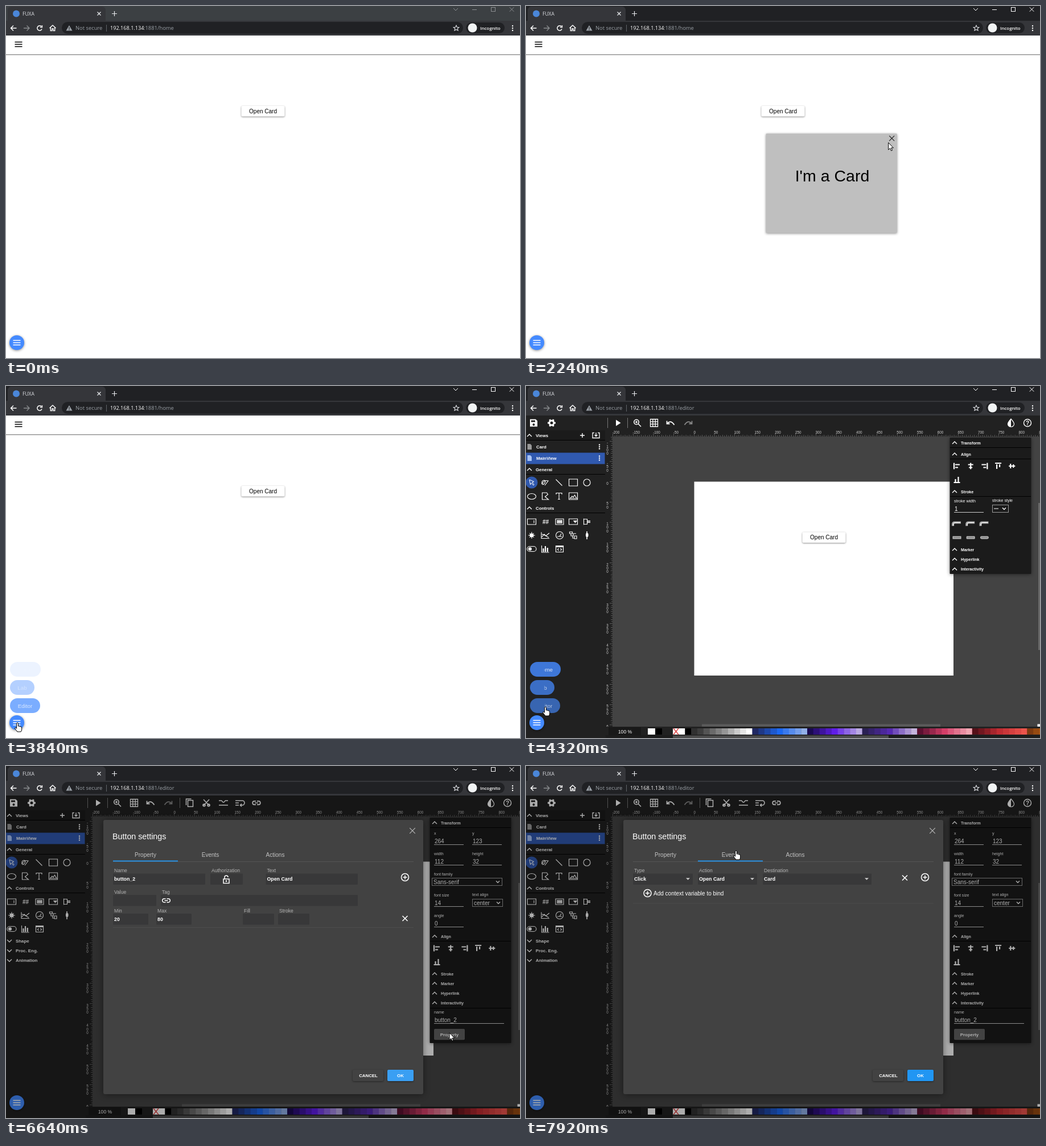
Write an HTML page with a canvas that moves like this. It is 903 px wide and 620 px high and loops after 8000 ms.

```html
<!DOCTYPE html>
<html lang="en">
<head>
<meta charset="utf-8">
<title>Card demo</title>
<style>
html, body { margin: 0; width: 100%; height: 100%; overflow: hidden; background: #fff }
canvas { display: block }
</style>
</head>
<body>
<canvas id="stage" width="903" height="620"></canvas>
<script>
const g = document.getElementById('stage').getContext('2d');
const SANS = '"Liberation Sans", Arial, sans-serif', UI = '"Open Sans", "Noto Sans", sans-serif';
const BLUE = '#3059af';

// ---- helpers ----
const clamp = v => Math.max(0, Math.min(1, v));
const ease = v => (v = clamp(v), v * v * (3 - 2 * v));

function rect(x, y, w, h, fill, r = 0, shadow = 0) {
  g.save();
  if (shadow) { g.shadowColor = 'rgba(0,0,0,.45)'; g.shadowBlur = shadow; g.shadowOffsetY = 1; }
  g.fillStyle = fill;
  g.beginPath();
  g.roundRect(x, y, w, h, r);
  g.fill();
  g.restore();
}
function box(x, y, w, h, color) {
  g.strokeStyle = color;
  g.lineWidth = 1;
  g.strokeRect(x + .5, y + .5, w, h);
}
function disc(x, y, r, fill) {
  g.fillStyle = fill;
  g.beginPath();
  g.arc(x, y, r, 0, 7);
  g.fill();
}
function path(d, x, y, stroke = '#fff', width = 1, fill) {
  const p = new Path2D(d);
  g.save();
  g.translate(x, y);
  if (fill) { g.fillStyle = fill; g.fill(p, 'evenodd'); }
  if (stroke) { g.strokeStyle = stroke; g.lineWidth = width; g.stroke(p); }
  g.restore();
}
const shape = (d, x, y, fill = '#fff') => path(d, x, y, null, 0, fill);
// y is the middle of the capitals
function text(s, x, y, size = 10, color = '#fff', weight = '', align = 'left', family = SANS) {
  g.font = `${weight} ${size}px ${family}`;
  g.fillStyle = color;
  g.textAlign = align;
  g.fillText(s, x, Math.round(y + size * .36));
}
const ring = r => `M${-r} 0a${r} ${r} 0 1 0 ${2 * r} 0a${r} ${r} 0 1 0 ${-2 * r} 0`;
const cross = r => `M${-r} ${-r}l${2 * r} ${2 * r}M${r} ${-r}l${-2 * r} ${2 * r}`;
const plus = r => `M${-r} 0h${2 * r}M0 ${-r}v${2 * r}`;
const bars = (w, gap) => `M${-w} ${-gap}h${2 * w}M${-w} 0h${2 * w}M${-w} ${gap}h${2 * w}`;
const UP = 'M-4 2l4-4 4 4', DOWN = 'M-4-2l4 4 4-4', CARET = 'M-3 -1.5l3 3 3-3';
const LINK = 'M-1-3.2h-2.6a3.2 3.2 0 0 0 0 6.4h2.6M1-3.2h2.6a3.2 3.2 0 0 1 0 6.4h-2.6M-3 0h6';
const dots = (x, y, gap) => [-gap, 0, gap].forEach(d => disc(x, y + d, 1.2, '#fff'));

// ---- browser ----
function browser(active, page) {
  rect(0, 0, 903, 52, active ? '#202124' : '#3c4043');
  rect(3, 1, 172, 30, '#35363a', [6, 6, 0, 0]);
  rect(0, 26, 903, 26, '#35363a');
  disc(18, 13.5, 6, '#4a86d8');
  text('FUXA', 29, 13.5, 8.5, '#dfe1e5', '', 'left', UI);
  path(cross(3), 163.5, 13.5, '#e8eaed', 1.2);
  path(plus(4.5), 190.5, 13.5, '#e8eaed', 1.2);
  const c = active ? '#fff' : '#8b8e91';
  path(DOWN, 790, 6, c);
  path('M-4 0h8', 823, 6.5, c);
  box(852, 2, 7, 7, c);
  path(cross(3.8), 888.5, 6, c);
  path('M5 0h-10M-.5-4.5l-4.5 4.5 4.5 4.5', 13.5, 39, '#fff', 1.5);
  path('M-5 0h10M.5-4.5l4.5 4.5-4.5 4.5', 36, 39, '#888a8d', 1.4);
  path('M4 1.5a4.2 4.2 0 1 1-1-4.5M4.4-5v3.6h-3.6', 59, 39, '#fff', 1.5);
  path('M-5.5 0l5.5-5 5.5 5M-3.7-1v5.5h2.6v-3.5h2.2v3.5h2.6v-5.5', 82, 39, '#fff', 1.4);
  rect(98, 28, 705, 21, '#202124', 10.5);
  shape('M0-5l5.5 9.5h-11zM-.6-1.8v3.2h1.2v-3.2zM-.6 2.2v1.2h1.2v-1.2z', 111, 39, '#9aa0a6');
  text('Not secure', 122, 39, 9.4, '#9aa0a6', '', 'left', UI);
  rect(176, 33, 1, 12, '#5f6368');
  text('192.168.1.134', 183, 39, 9.15, '#fff', '', 'left', UI);
  text(':1881/' + page, 242, 39, 9.4, '#9aa0a6', '', 'left', UI);
  path('M0-5l1.4 3.2 3.5.3-2.7 2.3.9 3.4-3.1-1.8-3.1 1.8.9-3.4-2.7-2.3 3.5-.3z', 791, 39, '#dadce0', 1.1);
  rect(808, 29, 68, 19, '#202124', 9.5);
  disc(819.5, 38.5, 8, '#f1f3f4');
  text('Incognito', 833, 39, 7.9, '#fff', '600', 'left', UI);
  dots(890, 39, 4);
}

// ---- shared page parts ----
function openButton(x, y) {
  rect(x, y, 76, 18.5, '#fff', 2, 3);
  text('Open Card', x + 38, y + 9, 10, '#000', '', 'center');
}
function menu(t) {
  [['Home', 54], ['Lab', 43], ['Editor', 53]].forEach(([s, w], i) => {
    const closing = t >= 4160;
    const a = closing ? 1 - (t - 4160) * (1.1 + .55 * i) / 1000 : clamp((t - 3700 - (2 - i) * 60) / 200);
    if (a <= 0 || t >= 4480) return;
    const y = 486 + 32 * i;
    g.save();
    g.globalAlpha = a;
    rect(7, y, w, 26, '#448aff', 13);
    if (t >= 4240) { g.beginPath(); g.rect(32.5, y, 40, 26); g.clip(); }
    text(s, 7 + w / 2, y + 13, 9.8, '#fff', '', 'center');
    g.restore();
  });
  rect(6, 580, 26, 26, '#448aff', 13, 4);
  path(bars(6.5, 4), 19, 593, '#fff', 1.3);
}

// ---- home ----
function home(t) {
  rect(0, 52, 903, 568, '#fff');
  rect(0, 85, 903, 1, '#8c8c8c');
  rect(0, 86, 903, 1, '#d5d5d5');
  path(bars(6.5, 4), 22, 67.5, '#000', 1.6);
  openButton(413.5, 176);
  if (t >= 800 && t < 2960) {
    const p = ease((t - 2080) / 480), x = 445 - 90 * p, y = 220 + 18 * p;
    rect(x, y, 230, 175, '#bfbfbf', 1, 4);
    path(cross(4.5), x + 221, y + 8.5, '#222', 1.2);
    text("I'm a Card", x + 51, y + 74, 28.5, '#000');
  }
}

// ---- editor ----
function head(s, x, y, down, size = 7.14) {
  path(down ? DOWN : UP, x, y, '#fff', 1.4);
  text(s, x + 11, y, size, '#fff', 'bold');
}
function toolbar(selected) {
  rect(0, 52, 903, 26, '#212121');
  shape('M-6.5-6.5h10l3 3v10h-13zM-4.5-4.5v3h7v-3zM-2 3a2 2 0 1 0 4 0a2 2 0 1 0-4 0z', 13.5, 65);
  path('M-7 0h14M-3.5-6l7 12M3.5-6l-7 12', 45, 65, '#fff', 3);
  disc(45, 65, 5.4, '#fff');
  disc(45, 65, 2.5, '#212121');
  const lines = [143, 178].concat(selected ? 305 : []);
  lines.forEach(x => rect(x, 56, 1, 18, '#777'));
  shape('M-4-5.5l8.5 5.5-8.5 5.5z', 162, 65);
  path(ring(4.2) + 'M3 3l5 5M-2 0h4M0-2v4', 194, 63.5, '#fff', 1.6);
  path('M-6.5-6.5h13v13h-13zM-2.2-6.5v13M2.2-6.5v13M-6.5-2.2h13M-6.5 2.2h13', 225, 65, '#fff', 1.3);
  path('M-6.5-3.5v5h5M-6 1q6-7 12.5 2.5', 254, 65, '#fff', 1.8);
  path('M6.5-3.5v5h-5M6 1q-6-7-12.5 2.5', 285, 65, '#888', 1.8);
  if (selected) {
    path('M-3.5-4.5h9v11h-9zM-6.5 4v-11h9', 323, 65, '#fff', 1.5);
    path('M-5-6l10 10.5M5-6l-10 10.5M-6 4a2 2 0 1 0 4 0a2 2 0 1 0-4 0M2 4a2 2 0 1 0 4 0a2 2 0 1 0-4 0', 352, 65, '#fff', 1.6);
    path('M-8-4h5M3-4h5M-8 4h16M-3-4q3 6 6 0', 382, 65, '#fff', 1.6);
    path('M-8-4h9M-8 0h6M-8 4h6M1-4h3a4 4 0 0 1 0 8h-3M3 1.5l-2.5 2.5 2.5 2.5', 411, 65, '#fff', 1.6);
    path(LINK, 440, 65, '#fff', 1.7);
  }
  path('M0-7q5.5 6 5.5 9a5.5 5 0 0 1-11 0q0-3 5.5-9z', 852, 65, '#fff', 1.2);
  shape('M0-7q-5.5 6-5.5 9a5.5 5 0 0 0 5.5 5z', 852, 65);
  path(ring(6.5), 881, 65, '#fff', 1.4);
  text('?', 881, 65, 10, '#fff', 'bold', 'center');
}
function rulers() {
  rect(140, 78, 763, 11, '#212121');
  rect(140, 78, 12, 522, '#212121');
  const k = .7137, gray = '#777';
  for (let u = -200; u < 852; u += 5) {
    const x = 295 + u * k, big = u % 50 === 0;
    rect(x, big ? 84 : u % 10 ? 87 : 86, .7, 5, gray);
    if (big) text(u, x - .5, 81.5, 6.3, '#ccc');
  }
  g.save();
  g.beginPath();
  g.rect(140, 89, 12, 511);
  g.clip();
  for (let u = -110; u < 606; u += 5) {
    const y = 168.3 + u * k, big = u % 50 === 0;
    rect(big ? 147 : u % 10 ? 150 : 149, y, 5, .7, gray);
    if (big) [...String(u)].forEach((c, i) => text(c, 143, y + 3.2 + i * 6.3, 6.3, '#ccc', '', 'center'));
  }
  g.restore();
  rect(152, 89, 751, 511, '#434343');
}
const TOOLS = [
  [34, 170, 'M-6 3q-1-7 4-7 4 1 0 6-4 4-3-1 3-6 10-4l-6 8'],
  [58, 170, 'M-5.5-5.5l11 11'],
  [83, 170, 'M-7.5-6h15v12h-15z'],
  [107, 170, ring(6)],
  [10, 194.5, 'M-7.5 0a7.5 5 0 1 0 15 0a7.5 5 0 1 0-15 0'],
  [34, 194, 'M-5.5 6v-12h8l2 3-5 4 6 5z'],
  [58, 194, 'M-5-3v-2.5h10v2.5M0-5.5v11M-2 5.5h4'],
  [83, 194, 'M-7.5-6h15v12h-15zM-5.5 4l3.5-4 2 2 2.5-4 3.5 6z'],
  [10, 239, 'M-7.5-5h15v10h-15zM4-2.5v5'],
  [59, 239, 'M-7-5h14v10h-14zM-4-2.5h8v5h-8zM-4-1h8M-4 0h8M-4 1h8'],
  [83, 239, 'M-7.5-5h15v10h-15zM1-1.5h5l-2.5 3zM2.5-.5h2'],
  [107, 239, 'M-5.5-5.5v11M-5.5-4.5h6v9h-6M0-1.5h6M0 0h6M0 1.5h6'],
  [34, 263, 'M-7-5.5v11h14M-6 3l4-5 3 3 6-5M-6-2l5 2 7 4'],
  [59, 263, ring(6.5) + 'M0 2l3-5M-4 2h8'],
  [83, 263, 'M-6.5-6h5v3h-5zM-4-3v4h4v-4h5M2 1h4v5h-4zM-1 1v4h3'],
  [10, 287, 'M-3.5-4.5h7a4.5 4.5 0 0 1 0 9h-7a4.5 4.5 0 0 1 0-9z'],
  [34, 287, 'M-6.5-6v12h13'],
  [59, 287, 'M-6.5-5.5h13v11h-13zM-6.5-4.5h13M-6.5-3.5h13M-1.5-1l-2 2 2 2M1.5-1l2 2-2 2']
];
function sidebar(t) {
  rect(0, 78, 140, 542, '#212121');
  const row = 'M-3.5-5h5l2.5 2.5v7.5h-7.5z';
  rect(0, 78, 139, 18, '#1b1b1b');
  head('Views', 6, 87, 0, 7.86);
  path(plus(4), 99, 87, '#fff', 1.4);
  path('M-3-4.5h-3v9h12v-9h-3M0-5v6M-2.5-1l2.5 2.5 2.5-2.5', 123, 87, '#fff', 1.3);
  rect(0, 95, 139, 1, '#000');
  shape(row, 6, 107, '#999');
  text('Card', 18, 107, 7.86, '#fff', 'bold');
  dots(129, 107, 3.5);
  rect(0, 117.5, 138.5, 20, BLUE);
  shape(row, 6, 127, '#a9c4f5');
  text('MainView', 18, 127, 7.86, '#fff', 'bold');
  dots(129, 127, 3.5);
  head('General', 6, 147, 0, 7.86);
  rect(0, 155, 139, 1, '#000');
  head('Controls', 6, 215, 0, 7.86);
  rect(0, 223, 139, 1, '#000');
  disc(10, 170, 10.5, BLUE);
  path('M-4-5l8 3.5-3.3 1.2 3.5 4-1.3 1.2-3.5-4-1.8 2.8z', 10, 170, '#fff', 1);
  TOOLS.forEach(([x, y, d]) => path(d, x, y, '#fff', 1.15));
  text('##', 34.5, 239, 10, '#fff', 'bold', 'center');
  path('M-6 0h12M0-6v12M-4-4l8 8M4-4l-8 8', 10, 263, '#fff', 1);
  disc(10, 263, 3.5, '#fff');
  path('M0-7v14', 107, 263, '#fff', 1.6);
  rect(105, 259, 4.5, 7, '#fff', 2);
  disc(7, 287, 3, '#fff');
  path('M-3.5 5v-6M0 5v-10M3.8 5v-7', 34, 287, '#fff', 2.2);
  if (t >= 4480) ['Shape', 'Proc. Eng.', 'Animation'].forEach((s, i) => head(s, 6, 308 + 17.2 * i, 1, 7.86));
}
// dark, middle and light shade of each group of nine
const SHADES = [
  [[62, 62, 62], [150, 150, 150], [255, 255, 255]],
  [[32, 40, 98], [28, 104, 240], [146, 176, 232]],
  [[26, 10, 82], [96, 30, 232], [186, 170, 226]],
  [[42, 32, 84], [86, 42, 176], [196, 180, 220]],
  [[92, 16, 48], [212, 62, 104], [240, 166, 178]],
  [[86, 16, 24], [192, 44, 50], [236, 84, 76]],
  [[126, 58, 16], [220, 120, 20], [250, 180, 90]]
];
function palette() {
  rect(140, 600, 763, 20, '#212121');
  rect(145, 601, 57, 15, '#191919');
  text('100 %', 174, 609, 8.6, '#fff', '', 'center');
  rect(214, 603, 13, 11, '#fff');
  rect(227, 603, 12, 11, '#000');
  const w = 10.73;
  rect(258, 603, w * 2, 11, '#fff');
  path('M1 0l9 11M10 0l-9 11', 258, 603, '#d33', 1.2);
  rect(258 + 2 * w, 603, w, 11, '#000');
  rect(258 + 3 * w, 603, w, 11, '#303030');
  SHADES.forEach((s, j) => {
    for (let i = 0; i < 9; i++) {
      const q = i / 4, n = Math.min(1, Math.floor(q));
      const c = s[n].map((v, m) => Math.round(v + (s[n + 1][m] - v) * (q - n)));
      rect(258 + (4 + j * 9 + i) * w, 603, w + .3, 11, `rgb(${c})`);
    }
  });
  rect(140, 615, 763, 5, '#1c1c1c');
  rect(258, 615.5, 379, 4.5, '#4c4c4c');
  rect(309, 595.5, 419, 4.5, '#5a5a5a');
  rect(900, 206, 3, 259, '#686868');
  rect(898.5, 595.5, 4.5, 4.5, '#fff');
}
const ALIGN = ['M-5-5.5v11M-3-2.5h8M-3 2.5h5', 'M0-5.5v11M-4.5-2.5h9M-3 2.5h6', 'M5-5.5v11M3-2.5h-8M3 2.5h-5',
  'M-5.5-5h11M-2.5-3v8M2.5-3v5', 'M-5.5 0h11M-2.5-4v8M2.5-3v6', 'M-5.5 5h11M-2.5 4v-5M2.5 4v-9'];
function alignment(y) {
  head('Align', 753, y);
  rect(745, y + 8, 142, 1, '#000');
  ALIGN.forEach((d, i) => path(d, 757 + (i % 5) * 24.2, y + (i < 5 ? 21 : 45), '#fff', 2.2));
}
function entry(label, value, x, y, w = 52) {
  text(label, x, y, 7.14);
  text(value, x + 1, y + 14, 10);
  rect(x, y + 20, w, 1, '#ccc');
}
function select(s, x, y, w) {
  box(x, y, w, 13, '#999');
  text(s, x + 3, y + 7, 10);
  path(CARET, x + w - 7, y + 7, '#fff', 1.4);
}
function panel(selected) {
  rect(744.5, 91, 143, selected ? 397 : 240, '#1b1b1b', 1, 6);
  head('Transform', 753, 100);
  rect(745, 108, 142, 1, '#000');
  if (!selected) {
    alignment(120);
    head('Stroke', 753, 186);
    rect(745, 194, 142, 1, '#000');
    entry('stroke width', '1', 752, 202);
    text('stroke style', 819, 201.5, 7.14);
    select('', 819, 209, 28);
    path('M0 0h8', 822, 216, '#fff', 1);
    for (let i = 0; i < 3; i++) {
      path('M-7 3.5v-3q0-3 3-3h11', 757 + 24.2 * i, 243, '#aaa', 4);
      path('M-6 3.5v-3q0-2.5 3-2.5h9', 757 + 24.2 * i, 242.5, '#fff', 1);
      rect(749.5 + 24.2 * i, 264.5, 15, 5, '#bbb', i * 1.2);
      rect(751 + 24.2 * i, 266.5, 12, 1, '#555');
    }
    ['Marker', 'Hyperlink', 'Interactivity'].forEach((s, i) => head(s, 753, 288 + 17.2 * i));
    return;
  }
  entry('x', '264', 752, 118);
  entry('y', '123', 819, 118);
  entry('width', '112', 752, 154);
  entry('height', '32', 819, 154);
  text('font family', 752, 190, 7.14);
  select('Sans-serif', 748, 197, 123);
  entry('font size', '14', 752, 227);
  text('text align', 819, 226, 7.14);
  select('center', 819, 234, 53);
  entry('angle', '0', 752, 263);
  alignment(300);
  ['Stroke', 'Marker', 'Hyperlink', 'Interactivity'].forEach((s, i) => head(s, 753, 366 + 17.1 * i));
  rect(745, 426, 142, 1, '#000');
  entry('name', 'button_2', 752, 433, 123);
  rect(752, 463, 54, 19.5, '#616161', 2, 2);
  text('Property', 779, 473, 7.9, '#fff', 'bold', 'center');
}
function editor(t) {
  const selected = t >= 5680;
  rulers();
  rect(295.5, 168.5, 455.5, 341.5, '#fff');
  openButton(485.5, 257.5);
  sidebar(t);
  toolbar(selected);
  palette();
  panel(selected);
  if (t >= 5600 && t < 5680) {
    rect(539, 273.5, 37, 17, '#2b2b2b');
    text('Layer 1', 557.5, 282, 8.4, '#fff', '', 'center', UI);
  }
}

// ---- dialog ----
function field(label, value, x, y, w, menu) {
  text(label, x + 2, y - 5.5, 8.57, '#b4b4b4');
  rect(x, y, w, 19.5, '#383839', 1);
  text(value, x + 2, y + 9.5, 8.8, '#fff', 'bold');
  if (menu) shape('M-3.5-1.7h7l-3.5 3.5z', x + w - 8.5, y + 9.5, '#ccc');
}
const addIcon = (x, y, r) => path(ring(r) + plus(r * .55), x, y, '#fff', 1.5);
function propertyTab() {
  field('Name', 'button_2', 188, 189.5, 162);
  field('Authorization', '', 359, 189.5, 57);
  field('Text', 'Open Card', 456.5, 189.5, 161.5);
  path('M-5-1h10v7.5h-10zM-3-1v-3a3 3 0 0 1 6 0', 387, 200, '#fff', 1.5);
  disc(387, 202.7, 1.4, '#fff');
  addIcon(701, 196, 6.5);
  field('Value', '', 188, 227, 76);
  field('Tag', '', 272, 227, 346);
  path(LINK, 281.5, 237, '#fff', 1.5);
  field('Min', '20', 188, 260, 62);
  field('Max', '80', 264, 260, 62);
  field('Fill', '', 416, 260, 55);
  field('Stroke', '', 478, 260, 55);
  path(cross(4.5), 701, 268.5, '#fff', 1.6);
  rect(188, 284, 528, 1, '#4d4d4d');
}
function eventsTab() {
  field('Type', 'Click', 188, 189.5, 105, 1);
  field('Action', 'Open Card', 302, 189.5, 104, 1);
  field('Destination', 'Card', 416, 189.5, 191, 1);
  path(cross(4.5), 665.5, 197, '#fff', 1.6);
  addIcon(701, 196, 6.5);
  addIcon(213.5, 224, 6.5);
  text('Add context variable to bind', 224, 224, 10);
  rect(188, 241.5, 528, 1, '#4a4a4a');
}
function dialog(t) {
  const p = clamp((t - 6480) / 160);
  if (!p) return;
  g.save();
  g.globalAlpha = p;
  rect(0, 52, 903, 568, 'rgba(0,0,0,.32)');
  const z = .7 + .3 * ease(p);
  g.translate(452, 336);
  g.scale(z, z);
  g.translate(-452, -336);
  rect(171, 95, 562, 483, '#424242', 3, 12);
  text('Button settings', 187, 123.5, 14.28);
  path(cross(4.8), 714, 114, '#b5b5b5', 1.2);
  ['Property', 'Events', 'Actions'].forEach((s, i) => text(s, 245 + 114 * i, 156, 10, '#c4c4c4', '', 'center'));
  const slide = ease((t - 7440) / 420);
  rect(188, 168, 528, 1, '#555');
  rect(188 + 114 * slide, 166.5, 114, 1.7, '#2196f3');
  g.save();
  g.beginPath();
  g.rect(187, 170, 530, 350);
  g.clip();
  g.translate(-528 * slide, 0);
  if (slide < 1) propertyTab();
  g.translate(528, 0);
  if (slide > 0) eventsTab();
  g.restore();
  rect(609, 535, 54, 20, '#424242', 2, 3);
  text('CANCEL', 636.5, 545, 7.86, '#fff', 'bold', 'center');
  rect(670, 535, 46, 20, t < 7440 ? '#3a9ff3' : '#2196f3', 2, 3);
  text('OK', 693, 545, 7.86, '#fff', 'bold', 'center');
  g.restore();
}

// ---- pointer: time, x, y, hand ----
const MOVES = [
  [160, 590, 560, 0], [720, 446, 187, 1], [1200, 446, 187, 0], [1280, 494, 203, 0], [1440, 630, 220, 0],
  [1520, 630, 215, 0], [1920, 660, 236, 0], [2080, 660, 236, 0], [2560, 570, 254, 0], [2720, 571, 247, 1],
  [3040, 571, 247, 0], [3200, 571, 247, 0], [3760, 20, 593, 1], [3840, 20, 593, 1], [4080, 34, 565, 1],
  [4400, 34, 565, 0], [4960, 31, 114, 1], [5040, 33, 116, 0], [5440, 532, 264, 1], [6080, 532, 264, 0],
  [6400, 779, 470, 1], [6640, 779, 470, 0], [6800, 757, 443, 0], [6960, 577, 245, 0], [7040, 580, 249, 0],
  [7120, 580, 249, 0], [7360, 369, 149, 1]
];
const ARROW = 'M0 0v12.5l2.9-2.6 2 4.4 2-.9-2-4.2h3.9z';
const HAND = 'M-1.4 1q1.4-2 2.8 0v5.2q1.6-.9 2.3.4 1.6-.6 2.2.6 1.7-.3 1.7 1.6v3q0 2.6-1.5 4.2h-6.2q-1.6-2.6-4.2-5.4-.6-2.2 1.6-1.6l1.3 1.3z';
function pointer(t) {
  const i = MOVES.findLastIndex(m => m[0] <= t);
  if (i < 0) return;
  const a = MOVES[i], b = MOVES[i + 1] || a;
  const p = b === a ? 0 : ease((t - a[0]) / (b[0] - a[0]));
  path(a[3] ? HAND : ARROW, a[1] + (b[1] - a[1]) * p, a[2] + (b[2] - a[2]) * p, '#000', 1, '#fff');
}

function draw(t) {
  const editing = t >= 4160;
  browser(t >= 160, editing ? 'editor' : 'home');
  (editing ? editor : home)(t);
  menu(t);
  dialog(t);
  pointer(t);
}
const start = performance.now();
function tick() {
  draw(Math.floor((performance.now() - start) % 8000 / 80) * 80);
  requestAnimationFrame(tick);
}
tick();
</script>
</body>
</html>
```
